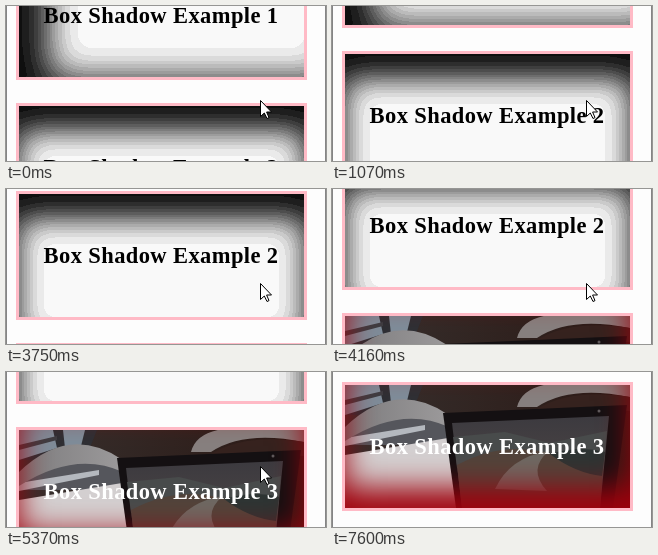
These frames come from a looping animation (320 px wide and 155 px high, 8.29 s). An HTML page:

```html
<!DOCTYPE html>
<html lang="en">
<head>
<meta charset="utf-8">
<title>Box shadow examples</title>
<style>
  html, body { margin: 0; width: 100%; height: 100%; overflow: hidden; background: #fdfdfd; }
  #stage { position: relative; width: 320px; height: 155px; overflow: hidden; }
  #stage::after {
    content: ""; position: absolute; inset: 0;
    border: solid #858585; border-width: 0 1px;
  }
  #page { position: absolute; left: 10px; top: 0; }
  .box {
    position: absolute; width: 285px; height: 123px;
    border: 3px solid #ffbac6; background: #fafafa; overflow: hidden;
  }
  .box:nth-child(1) { top: -152px; }
  .box:nth-child(2) { top: 0; }
  .box:nth-child(3) { top: 152px; }
  .shade, .photo { position: absolute; inset: 0; }
  .left { background: #fafafa; box-shadow: inset 30px 0 35px #000; filter: url(#bands); }
  .top { background: #fafafa; box-shadow: inset 0 25px 30px #000; filter: url(#bands); }
  .bottom { box-shadow: inset 0 -20px 30px #a0000c; }
  h2 {
    position: absolute; left: 24.6px; top: 0; margin: 0;
    font: bold 22.5px/123px "Liberation Serif", "Times New Roman", serif;
    letter-spacing: .4px; white-space: nowrap; color: #000;
  }
  .light { color: #fff; }
  #cursor { position: absolute; left: 0; top: 0; overflow: visible; }
</style>
</head>
<body>
<div id="stage">
  <div id="page">
    <div class="box"><div class="shade left"></div><h2>Box Shadow Example 1</h2></div>
    <div class="box"><div class="shade top"></div><h2>Box Shadow Example 2</h2></div>
    <div class="box">
      <svg class="photo" width="285" height="123">
        <defs>
          <linearGradient id="wall"><stop stop-color="#37302e"/><stop offset="1" stop-color="#2a1814"/></linearGradient>
          <linearGradient id="chair"><stop stop-color="#7c7b7d"/><stop offset="1" stop-color="#9c9a9b"/></linearGradient>
          <linearGradient id="sky" x2="0" y2="1"><stop stop-color="#3c3a3f"/><stop offset="1" stop-color="#544b48"/></linearGradient>
        </defs>
        <rect width="285" height="123" fill="url(#wall)"/>
        <!-- window -->
        <path d="M0 0H78L66 30H0Z" fill="#2e2f34"/>
        <path d="M0 0H34L38 18L0 30ZM44 0H66L62 16L46 18Z" fill="#7e8c99"/>
        <path d="M0 15L38 6V10L0 20Z" fill="#3d3d42"/>
        <!-- sill, desk and chairs -->
        <path d="M0 44Q50 20 102 40V60H0Z" fill="#55565c"/>
        <path d="M0 53L80 40V45L0 61Z" fill="#b4b8be"/>
        <path d="M0 70L103 53L112 123H0Z" fill="#d3cfd0"/>
        <path d="M0 42Q50 -6 102 29L104 42Q56 20 0 56Z" fill="url(#chair)"/>
        <path d="M172 22Q178 -2 220 -2H285V12Q225 0 192 22Z" fill="#867f7e"/>
        <path d="M192 24Q226 3 285 12V26Z" fill="#35221e"/>
        <!-- monitor -->
        <path d="M98 28L282 20L268 123H111Z" fill="#141012"/>
        <path d="M107 38L264 31L255 123H117Z" fill="url(#sky)"/>
        <path d="M108 52L160 47L205 58L262 46L259 76L190 69L112 83Z" fill="#484b4b"/>
        <path d="M112 80Q160 54 210 70T258 82L255 123H117Z" fill="#51433a"/>
        <path d="M150 104Q165 72 204 66Q182 84 202 106Z" fill="#6d6862"/>
        <path d="M205 69Q236 60 260 67L257 91Q230 88 205 69Z" fill="#2d3433"/>
        <circle cx="254" cy="26" r="1.5" fill="#5f5a5c"/>
      </svg>
      <div class="shade bottom"></div>
      <h2 class="light">Box Shadow Example 3</h2>
    </div>
  </div>
  <svg id="cursor" width="13" height="20">
    <path d="M.5 .5V16.5L4.3 13L7 18.5L9 17.6L6.6 12H11.5Z" fill="#fff" stroke="#000"/>
  </svg>
</div>
<svg width="0" height="0" style="position:absolute">
  <filter id="bands" x="0" y="0" width="1" height="1" color-interpolation-filters="sRGB">
    <feComponentTransfer id="levels"></feComponentTransfer>
  </filter>
</svg>
<script>
const LOOP = 8290;
const page = document.getElementById("page");
const cursor = document.getElementById("cursor");

// Sixteen even grey bands
const greys = Array.from({ length: 16 }, (_, i) => (0.06 + i * 0.92 / 15).toFixed(3)).join(" ");
for (const channel of ["R", "G", "B"]) {
  const func = document.createElementNS("http://www.w3.org/2000/svg", "feFunc" + channel);
  func.setAttribute("type", "discrete");
  func.setAttribute("tableValues", greys);
  document.getElementById("levels").append(func);
}

// Moments at which the scroll position advances
const ticks = [0, 120, 240, 390, 540, 660, 810, 930, 1070, 1190, 1320, 1440, 1580, 1710, 1860,
  3750, 3880, 4030, 4160, 4310, 4430, 4580, 4710, 4860, 5000, 5120, 5250, 5370,
  5520, 5670, 5820, 5970, 6100, 6250, 6370, 6520];

// [time, top of the second box]
const path = [[0, 97], [1070, 45], [1710, 13], [1860, 10], [3620, 10], [3750, 2],
  [4710, -68], [6100, -129], [6370, -139], [6520, -142]];

function scrollAt(time) {
  const next = path.findIndex(([t]) => t > time);
  if (next < 0) return path[path.length - 1][1];
  const [t0, y0] = path[next - 1];
  const [t1, y1] = path[next];
  return Math.round(y0 + (y1 - y0) * (time - t0) / (t1 - t0));
}

function draw() {
  const time = performance.now() % LOOP;
  const tick = ticks.filter(t => t <= time).pop();
  page.style.top = scrollAt(tick) + "px";
  const [x, y] = time < 7480 ? [254, 94] : [218, 87];
  cursor.style.transform = `translate(${x}px, ${y}px)`;
  cursor.style.visibility = time < 7600 ? "visible" : "hidden";
  requestAnimationFrame(draw);
}
draw();
</script>
</body>
</html>
```
